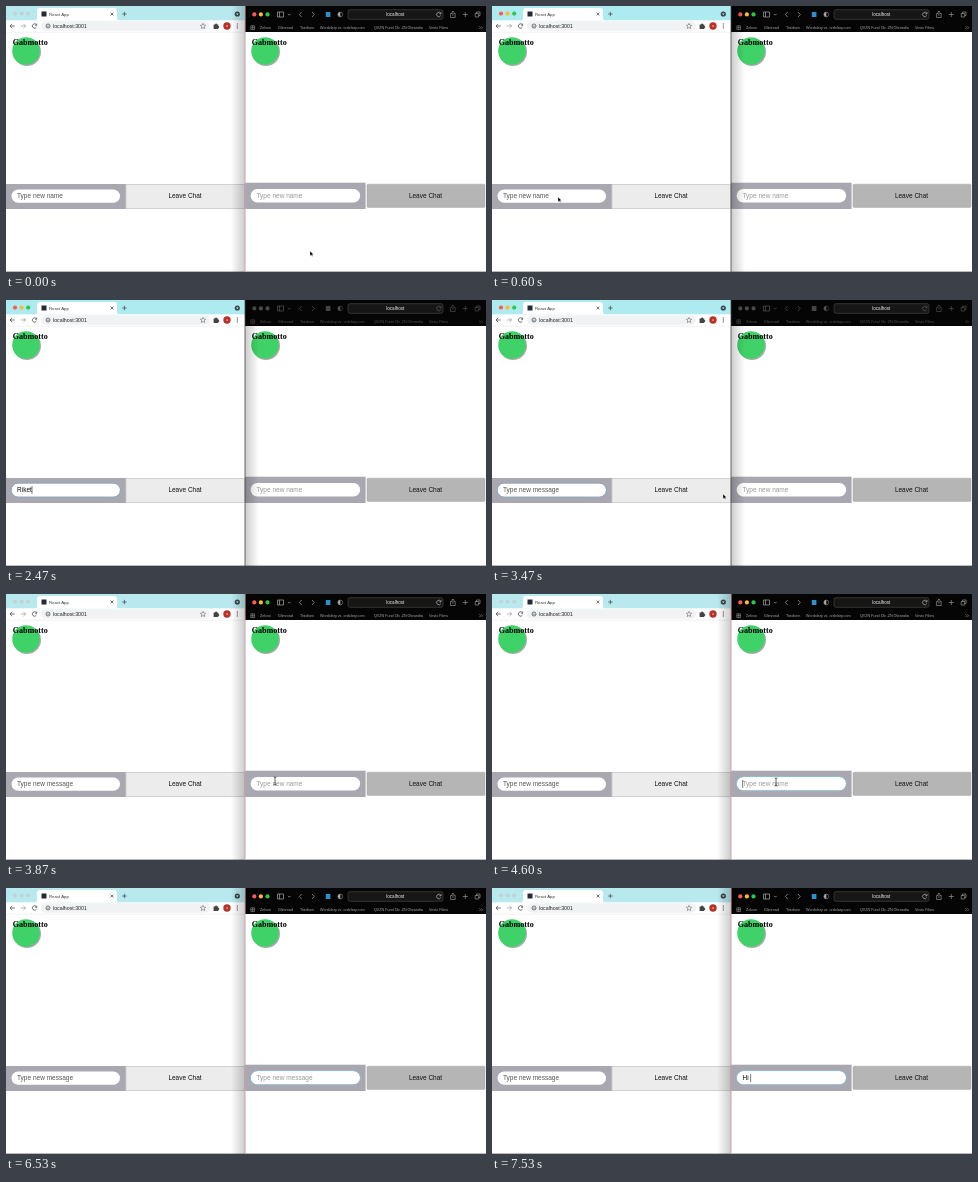
An HTML page that plays this animation: 480 px wide and 266 px high, repeating every 8 s.

```html
<!DOCTYPE html>
<html lang="en">
<head>
<meta charset="utf-8">
<title>Two-window chat</title>
<style>
  html, body { margin: 0; width: 100%; height: 100%; overflow: hidden; background: #fff; }
  svg { display: block; width: 100vw; height: 100vh; }
  text { font-family: "Liberation Sans", Arial, sans-serif; font-size: 6.5px; white-space: pre; }
  .line { fill: none; stroke: currentColor; stroke-width: .8; }
  .brand { font: bold 8.1px "Liberation Serif", "Times New Roman", serif; }
  .mark text { font-size: 3.7px; fill: currentColor; }
  .caret { stroke: #222; stroke-width: .6; }
  .ring { fill: none; stroke: #8ea9bd; stroke-width: 1; }
  #strip { fill: #aeebf1; }
  #left { color: #505357; }
  #right { color: #aaa; }
  .rightOn #strip { fill: #b8e9ee; }
  .rightOn #left .light { fill: #c3d2d4; }
  .dim #right { color: #555; }
  .dim #right .light { fill: #4a4a4a; }
  .dim #ext { fill: #444; }
</style>
</head>
<body>
<svg id="stage" viewBox="0 0 480 266" preserveAspectRatio="none">
  <defs>
    <linearGradient id="fadeL"><stop stop-color="#000" stop-opacity="0"/><stop offset="1" stop-color="#000" stop-opacity=".2"/></linearGradient>
    <linearGradient id="fadeR"><stop stop-color="#000" stop-opacity=".2"/><stop offset="1" stop-color="#000" stop-opacity="0"/></linearGradient>
    <g id="logo">
      <circle cx="21" cy="46" r="14" fill="#aaa"/>
      <circle cx="20" cy="45" r="13.8" fill="#3fd268"/>
      <text class="brand" x="6.7" y="39.2">Gabmotto</text>
    </g>
    <path id="reload" class="line" d="M2 -1A2.2 2.2 0 1 0 2 1M2.2 -2.4V-.7H.6"/>
  </defs>

  <g id="left">
    <rect width="239" height="266" fill="#fff"/>
    <rect id="strip" width="239" height="15"/>
    <g class="lights"></g>
    <path d="M29 14.5Q31 14.5 31 12V5Q31 2 34 2H108Q111 2 111 5V12Q111 14.5 113 14.5Z" fill="#fff"/>
    <rect x="35.5" y="5.5" width="5" height="5" fill="#252a33"/>
    <text x="43" y="9.6" style="font-size:4.3px" fill="#333">React App</text>
    <path class="line" d="M104.6 6.6l2.8 2.8m0-2.8l-2.8 2.8M116.2 8h4.4m-2.2-2.2v4.4"/>
    <circle cx="231.3" cy="8" r="2.6" fill="#37474b"/>
    <path d="M230 7.4h2.6l-1.3 1.6z" fill="#fff"/>
    <rect y="14.3" width="239" height="11.7" fill="#fff"/>
    <rect x="35" y="15.3" width="169" height="9.4" rx="4.7" fill="#f0f2f3"/>
    <path class="line" d="M8.8 20H4m2.2-2.2L4 20l2.2 2.2"/>
    <path class="line" d="M14.8 20h4.8m-2.2-2.2l2.2 2.2-2.2 2.2" opacity=".5"/>
    <use href="#reload" x="28.5" y="20"/>
    <circle class="line" cx="42" cy="20" r="2"/>
    <path class="line" d="M42 19.6v1.4"/>
    <text x="47" y="21.8" style="font-size:5.25px" fill="#222">localhost:3001</text>
    <path class="line" d="M197 17.4l.8 1.7 1.9.2-1.4 1.3.4 1.9-1.7-1-1.7 1 .4-1.9-1.4-1.3 1.9-.2z" style="stroke-width:.5"/>
    <path d="M207.6 18.6h1.5a1 1 0 0 1 2 0h1.2v1.3a1 1 0 0 1 0 2v1h-4.7z" fill="#444"/>
    <circle cx="221" cy="20" r="3.7" fill="#b93227"/>
    <text x="221" y="21.3" text-anchor="middle" style="font-size:3.6px" fill="#fff">u</text>
    <path d="M231.3 17.9v.1m0 1.9v.1m0 1.9v.1" stroke="#444" stroke-width="1.1" stroke-linecap="round"/>
    <path d="M0 26.2H239" stroke="#ddd" stroke-width=".4"/>
    <use href="#logo"/>
    <rect y="178" width="120" height="25" fill="#a9a8b0"/>
    <rect x="5.5" y="183.5" width="108.5" height="13.2" rx="6.6" fill="#fff"/>
    <rect class="ring" x="5" y="183" width="109.5" height="14.2" rx="7.1"/>
    <text class="value" x="11" y="192.4"/>
    <path class="caret"/>
    <rect x="120" y="178.4" width="118.4" height="24.2" fill="#ececec" stroke="#cacaca" stroke-width=".8"/>
    <text x="179" y="192.4" text-anchor="middle" fill="#111">Leave Chat</text>
    <path d="M0 265.5H239" stroke="#bbb"/>
    <rect id="shadeL" x="225" y="0" width="14" height="266" fill="url(#fadeL)"/>
  </g>

  <g id="right">
    <rect x="239" width="241" height="266" fill="#fff"/>
    <rect x="239" width="241" height="26" fill="#050505"/>
    <g class="lights" transform="translate(239.3 .8)"></g>
    <path class="line" d="M271.5 6h6v5h-6zM273.5 6v5M282 7.9l1.3 1.3 1.3-1.3M295.6 6l-2.2 2.5 2.2 2.5M306 6l2.2 2.5L306 11" style="stroke-width:.7"/>
    <rect id="ext" x="319.8" y="6" width="4.6" height="5" fill="#2d8fd0"/>
    <circle class="line" cx="334.3" cy="8.5" r="2.4" style="stroke-width:.5"/>
    <path d="M334.3 6.1a2.4 2.4 0 0 0 0 4.8z" fill="currentColor"/>
    <rect x="342" y="3.7" width="95" height="9.6" rx="2" fill="#161617" stroke="#4c4c4e" stroke-width=".6"/>
    <text x="389.3" y="10.1" text-anchor="middle" style="font-size:4.6px" fill="#eee">localhost</text>
    <use href="#reload" x="432.8" y="8.5"/>
    <path class="line" d="M446 7.5h-1.4v4h4.6v-4h-1.4M446.9 9.8V5.2m-1.4 1.3l1.4-1.4 1.4 1.4M456.8 8.5h5m-2.5-2.5v5M469.2 7.5h3.5v3.5h-3.5zM470.5 7.5V6h3.5v3.5h-1.3" style="stroke-width:.6"/>
    <path class="line" d="M244.8 19.8h3.8v3.8h-3.8zM246.7 19.8v3.8M244.8 21.7h3.8M473.3 20.3l1.4 1.4-1.4 1.4m2-2.8l1.4 1.4-1.4 1.4" style="stroke-width:.5"/>
    <g class="mark">
      <text x="254" y="23.1">Zelvoo</text>
      <text x="272" y="23.1">Glimroad</text>
      <text x="294" y="23.1">Tradiven</text>
      <text x="314" y="23.1">Wordolary vs. ordolary.com</text>
      <text x="368" y="23.1">QVZN Fund Ob..ZN Obrandia</text>
      <text x="423" y="23.1">Vesto Films</text>
    </g>
    <use href="#logo" x="239"/>
    <rect x="239" y="176.7" width="120.6" height="26.3" fill="#a9a8b0"/>
    <rect x="244.6" y="183" width="109.6" height="13.4" rx="6.7" fill="#fff"/>
    <rect class="ring" x="244.3" y="182.6" width="110.2" height="14.2" rx="7.1" style="stroke:#91bdcb"/>
    <text class="value" x="250.5" y="192.1"/>
    <path class="caret"/>
    <rect x="361" y="178.2" width="118" height="23.2" rx="1" fill="#b5b5b5" stroke="#a5a5a5" stroke-width=".5"/>
    <text x="419.5" y="192.1" text-anchor="middle" fill="#111">Leave Chat</text>
    <path d="M239 265.5H480" stroke="#bbb"/>
    <rect id="shadeR" x="239" y="0" width="14" height="266" fill="url(#fadeR)"/>
  </g>

  <path id="seam" d="M239 0V266"/>
  <path id="arrow" d="M0 0V4.9L1.2 3.8 2 5.5 2.8 5.1 2.1 3.5H3.6Z" fill="#000" stroke="#fff" stroke-width=".35"/>
  <path id="beam" d="M-1.4 -4Q0 -4 0 -3Q0 -4 1.4 -4M0 -3V3M-1.4 4Q0 4 0 3Q0 4 1.4 4" fill="none" stroke="#222" stroke-width=".7"/>
</svg>
<script>
const $ = s => document.querySelector(s);
const LOOP = 8000;
const NAME = "Type new name", MESSAGE = "Type new message";

for (const g of document.querySelectorAll(".lights"))
  g.innerHTML = ["#fb5b55", "#fcbb2f", "#2fc747"].map((c, i) =>
    `<circle class="light" cx="${9 + i * 6.6}" cy="7.6" r="2.1" fill="${c}"/>`).join("");

// [time, typed text, placeholder]
const leftText = [[0, "", NAME], [1670, "R"], [1870, "Ri"], [2130, "Rik"], [2270, "Rike"],
  [2470, "Riket"], [2530, "Riketa"], [2670, "Riketas"], [2870, "", MESSAGE]];
const rightText = [[0, "", NAME], [5000, "L"], [5200, "Le"], [5400, "Len"], [5600, "Lena"],
  [5870, "", MESSAGE], [6870, "H"], [7070, "Hi"], [7470, "Hi "]];

// [time, x, y] of the pointer
const path = [[0, 304, 245], [70, 240, 240], [130, 90, 226], [270, 72, 203], [330, 66, 191],
  [3200, 72, 191], [3330, 165, 193], [3470, 231, 194], [3600, 236, 194], [3730, 255, 190],
  [3870, 269, 187], [4130, 278, 187], [4200, 284, 188]];

const at = (keys, t) => keys.findLast(k => k[0] <= t);
const show = (el, on) => el.style.display = on ? "" : "none";

function field(id, keys, t, focused, hint, since) {
  const [start, typed, placeholder] = at(keys, t);
  const value = $(id + " .value"), caret = $(id + " .caret");
  value.textContent = typed || placeholder;
  value.setAttribute("fill", typed ? "#111" : hint);
  show($(id + " .ring"), focused);
  const x = +value.getAttribute("x") + (typed ? value.getComputedTextLength() : 0) + .2;
  caret.setAttribute("d", `M${x} 186V194`);
  show(caret, focused && (t - Math.max(start, since)) % 1000 < 530);
}

function draw(t) {
  const leftOn = t >= 600 && t < 3800;
  $("#stage").classList.toggle("rightOn", !leftOn);
  $("#stage").classList.toggle("dim", t >= 670 && t < 3800);
  show($("#shadeL"), !leftOn);
  show($("#shadeR"), leftOn);
  $("#seam").setAttribute("stroke", leftOn ? "#444" : "#c7a4ab");
  $("#seam").setAttribute("stroke-width", leftOn ? .8 : 1);

  field("#left", leftText, t, t >= 670 && t < 3800, "#555", 600);
  field("#right", rightText, t, t >= 4600, "#999", 4600);

  const [, x, y] = at(path, t);
  const visible = t < 1670 || t >= 3200 && t < 5000;
  const overInput = y > 183 && y < 197 &&
    (leftOn ? t >= 730 && x < 114 : x > 244 && x < 354);
  for (const [id, on] of [["#arrow", !overInput], ["#beam", overInput]]) {
    show($(id), visible && on);
    $(id).setAttribute("transform", `translate(${x} ${y})`);
  }
}

const begin = performance.now();
function tick() {
  draw((performance.now() - begin) % LOOP);
  requestAnimationFrame(tick);
}
tick();
</script>
</body>
</html>
```
